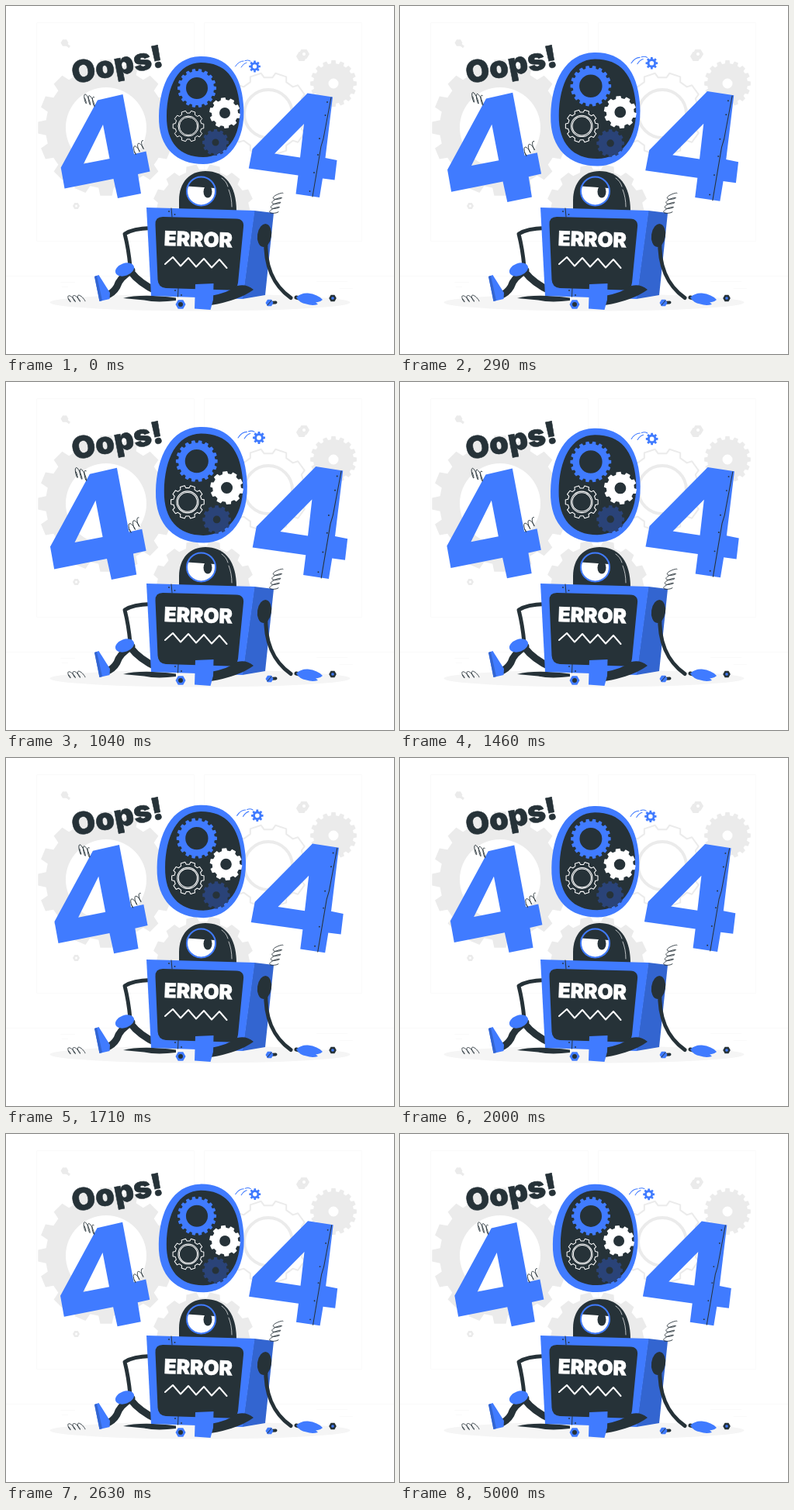
These frames come from a looping animation (500 px wide and 449 px high, 7.37 s). An HTML page:

```html
<!DOCTYPE html>
<html lang="en">
<head>
<meta charset="utf-8">
<title>404</title>
<style>
  html, body { margin: 0; width: 100%; height: 100%; overflow: hidden; background: #fff; }
  svg { display: block; width: 100%; height: 100%; }
  text { font-family: Inter, "Open Sans", sans-serif; font-weight: 900; stroke-width: .6; }
  .blue { fill: #407bff; }
  .dark { fill: #263238; }
  .grey { fill: #ebebeb; }
  .side { fill: #3365d0; }
  .navy { fill: #2a4378; }
  .white { fill: #fff; }
  .line { fill: none; stroke: #263238; stroke-linecap: round; stroke-linejoin: round; }
  .pale { fill: none; stroke: #ebebeb; }
  .faint { fill: none; stroke: #fafafa; }
</style>
</head>
<body>
<svg viewBox="0 0 500 449">
  <g id="backdrop">
    <path class="faint" d="M39.5 21.5H242.5V303.5H39.5ZM255.5 21.5H458.5V303.5H255.5Z"/>
    <path class="faint" d="M0 348.5H500M70 356.5H89M400 355.5H440M430 364.5H447M72 362.5H80"/>
    <ellipse cx="250" cy="382.5" rx="193.500" ry="11" fill="#f5f5f5"/>
  </g>

  <text class="dark" stroke="#263238" font-size="39.5" transform="translate(87.5 100.500) rotate(-11)">Oops!</text>

  <g id="sign">
    <path class="blue" fill-rule="evenodd" d="M118 121.500L150.500 114L165 191L180.500 187.500L185.500 213.500L170 217L174 242L144 248L138.500 223L75.500 235.500L70.700 208.500ZM125 153L100 203.500L133.500 197Z"/>
    <path class="blue" fill-rule="evenodd" d="M388.500 112.500L421 117.500L411.500 196L426.500 199L423.500 224.500L408 222.500L404 247L373.500 242.500L376.500 218.500L312.800 209.500L317.500 184.500ZM384 152L346 190.500L379 195.500Z"/>
    <path class="line" d="M419 118L409 171L406 181L395 246"/>
    <path class="blue" d="M250 65C283 64 303 86 306 127C310 176 285 204 254 204C221 204 196 184 197 142C198 100 215 66 250 65Z"/>
    <path class="dark" d="M251 73C283 73 298 93 301 127C304.500 171 283 194.500 254 195C224 195 206.500 176 207 142C207.500 103 222 73.500 251 73Z"/>
    <path fill="none" stroke="#407bff" stroke-linecap="round" d="M295.500 78Q300 71 306 71M303 79Q306 74 310 73M308 70.500Q312 69 315 71"/>
  </g>

  <g id="robot">
    <path class="line" stroke-width="5" d="M186 286.500Q164 287 153 294Q158 314 160 336"/>
    <path class="line" stroke-width="9" stroke-linecap="butt" d="M196 369Q172 358 160 342M162 341Q146 351 143 362Q138 371 128 374"/>
    <ellipse class="blue" cx="153" cy="340" rx="12.500" ry="8" transform="rotate(-20 153 340)"/>
    <path class="blue" d="M114 349L119.500 347L134 370L133.500 378L120.500 381Z"/>
    <path class="side" d="M114 349L117 348L124 380L120.500 381Z"/>
    <path class="dark" d="M151 377Q174 371 219 376.500V380Q194 383 178 379.500Z"/>

    <path class="dark" d="M223 264V251C223 227 237 213 257 213C282 213 297 231 297 265Z"/>
    <path fill="none" stroke="#fff" stroke-width=".7" stroke-linecap="round" d="M278 222Q284 226 286 233M287 237Q291 247 291 259"/>
    <circle class="white" cx="251.500" cy="239" r="18"/>
    <path class="dark" d="M233.500 232.500A18 18 0 0 1 269 235Z"/>
    <ellipse class="dark" cx="260" cy="239.500" rx="5.500" ry="8"/>
    <circle fill="none" stroke="#407bff" stroke-width="2" cx="251.500" cy="239" r="18.500"/>

    <path class="side" d="M320 264L345 267L334 373L304.500 378Z"/>
    <path class="blue" d="M181 260L320.500 264L305 378L187 374Z"/>
    <path class="dark" d="M192.500 282Q192 272 202 272L297 274.500Q307 275 306 285L299 357Q298 367 288 366.500L206 364Q196 363 195.500 353Z"/>
    <path class="line" d="M213 261L214 272M222 364L221.500 375"/>
    <text class="white" stroke="#fff" font-size="26" transform="translate(203.500 309) rotate(1.700)">ERROR</text>
    <polyline fill="none" stroke="#fff" stroke-width="2" stroke-linecap="round" stroke-linejoin="round"
      points="205,333 215,324 225,335.500 235,325 245,336.500 255,326 265,337.500 275,327 284.500,338"/>

    <path class="dark" d="M264 374Q286 370 298 361Q310 358 319 366Q300 380 264 386Z"/>
    <path class="blue" d="M244 359L267.500 358L267 379L263.500 392L243 390.500Z"/>

    <ellipse class="dark" cx="333" cy="296" rx="9" ry="15" transform="rotate(8 333 296)"/>
    <path class="line" stroke-width="5" d="M335 300C333 335 345 361 367 376.500"/>
    <path class="line" stroke-width="5" d="M374 376L378 377"/>
    <path class="blue" d="M374 376Q380 370 389 370.500Q402 372 408 379Q404 383 399 382L402 385Q394 387 387 384.500Q378 383 374 376Z"/>
    <path class="line" stroke-width="4" d="M340 383L347.500 382.500"/>
  </g>
</svg>
<script>
const layer = id => document.getElementById(id);
const add = (id, markup) => layer(id).insertAdjacentHTML('beforeend', markup);
const ring = (x, y, r) => `M${x - r} ${y}a${r} ${r} 0 1 0 ${2 * r} 0a${r} ${r} 0 1 0 ${-2 * r} 0Z`;

function gearPath(x, y, outer, inner, teeth, phase = 0) {
  const points = [];
  for (let i = 0; i < teeth; i++) {
    for (const [offset, r] of [[-.32, inner], [-.22, outer], [.22, outer], [.32, inner]]) {
      const a = (i + offset) / teeth * 2 * Math.PI + phase;
      points.push(`${(x + r * Math.cos(a)).toFixed(2)} ${(y + r * Math.sin(a)).toFixed(2)}`);
    }
  }
  return `M${points.join('L')}Z`;
}

function gear(id, style, x, y, outer, inner, teeth, hole, phase) {
  add(id, `<path class="${style}" fill-rule="evenodd" d="${gearPath(x, y, outer, inner, teeth, phase)}${ring(x, y, hole)}"/>`);
}

function outlineGear(id, attrs, x, y, outer, inner, teeth, ...holes) {
  const d = gearPath(x, y, outer, inner, teeth) + holes.map(r => ring(x, y, r)).join('');
  add(id, `<path fill="none" stroke-linejoin="round" ${attrs} d="${d}"/>`);
}

// A coil is a slanted ellipse travelling along a straight line.
function coil(id, x0, y0, x1, y1, loops, rx, ry, slantX, slantY) {
  const points = [], steps = Math.round(loops * 20);
  for (let i = 0; i <= steps; i++) {
    const p = i / steps, a = p * loops * 2 * Math.PI;
    const x = x0 + (x1 - x0) * p + rx * Math.cos(a) + slantX * Math.sin(a);
    const y = y0 + (y1 - y0) * p + ry * Math.sin(a) + slantY * Math.cos(a);
    points.push(`${x.toFixed(1)},${y.toFixed(1)}`);
  }
  add(id, `<polyline class="line" stroke-width=".9" points="${points.join(' ')}"/>`);
}

function nut(id, style, x, y, r, core, coreRadius) {
  const corners = [...Array(6)].map((_, i) => {
    const a = i * Math.PI / 3;
    return `${x + r * Math.cos(a)},${y + r * Math.sin(a)}`;
  });
  add(id, `<polygon class="${style}" points="${corners.join(' ')}"/><circle class="${core}" cx="${x}" cy="${y}" r="${coreRadius}"/>`);
}

gear('backdrop', 'grey', 129, 157, 88, 78, 16, 52, Math.PI);
gear('backdrop', 'grey', 254, 272, 68, 61, 14, 30);
gear('backdrop', 'grey', 422, 100, 30, 26, 16, 6.5);
outlineGear('backdrop', 'stroke="#ebebeb" stroke-width="2"', 338, 139, 53, 47, 10);
add('backdrop', '<circle class="pale" stroke-width="4" cx="338" cy="139" r="31"/>');
add('backdrop', '<path class="pale" stroke-width="3" d="M76 48L82 53"/>');
nut('backdrop', 'grey', 381, 65, 7, 'grey', 3);
nut('backdrop', 'grey', 384, 62, 7, 'white', 2);
nut('backdrop', 'grey', 75.5, 47.5, 5, 'grey', 2);
nut('backdrop', 'grey', 90.5, 258, 4.5, 'white', 1.5);

gear('sign', 'blue', 246, 106, 25, 22, 18, 14);
gear('sign', 'white', 282, 138, 20, 17, 10, 7, .2);
gear('sign', 'navy', 270, 176, 17, 14.5, 12, 4.5);
gear('sign', 'blue', 320.5, 78, 7.5, 5.5, 8, 2.7);
outlineGear('sign', 'stroke="#fff"', 235, 155, 20, 17, 10, 13, 11.5);
coil('sign', 100, 119, 115, 124, 2.8, 1.6, 6.5, 2, 0);
coil('sign', 164, 188, 178, 178, 2.8, 1.5, 4.5, 2, 0);
for (const [x, y] of [[414, 124], [411.5, 141], [404, 171], [402, 192], [397, 215], [391.5, 239]])
  add('sign', `<circle class="dark" cx="${x}" cy="${y}" r=".9"/>`);

coil('robot', 345, 267, 351, 243, 4, 6, 1.8, 0, -1.5);
coil('robot', 79, 378, 99, 377, 3.2, 1.8, 4, 2.5, 0);
for (const [x, y] of [[210, 265], [217.5, 269], [218, 367], [226, 373]])
  add('robot', `<circle class="dark" cx="${x}" cy="${y}" r=".9"/>`);
nut('robot', 'blue', 225, 385, 6.5, 'dark', 3);
nut('robot', 'blue', 339.5, 383, 5, 'blue', 2);
add('robot', '<path class="line" d="M337 386L342 380"/>');
nut('robot', 'dark', 421, 377, 4.8, 'blue', 1.8);

const LOOP = 7370, FPS = 24, PULSE_FRAMES = 65, PEAK_FRAME = 13;
const CENTER = [249, 157];

// Linear swell and decay; the last two poses are held.
function pulseScale(time) {
  const frame = time >= 5000 ? 64 : Math.min(63, Math.floor(time * FPS / 1000 + .12));
  return 1 + .1 * (frame < PEAK_FRAME
    ? frame / PEAK_FRAME
    : (PULSE_FRAMES - frame) / (PULSE_FRAMES - PEAK_FRAME));
}

function draw() {
  const [x, y] = CENTER;
  const scale = pulseScale(performance.now() % LOOP);
  layer('sign').setAttribute('transform', `translate(${x} ${y}) scale(${scale}) translate(${-x} ${-y})`);
  requestAnimationFrame(draw);
}
draw();
</script>
</body>
</html>
```
